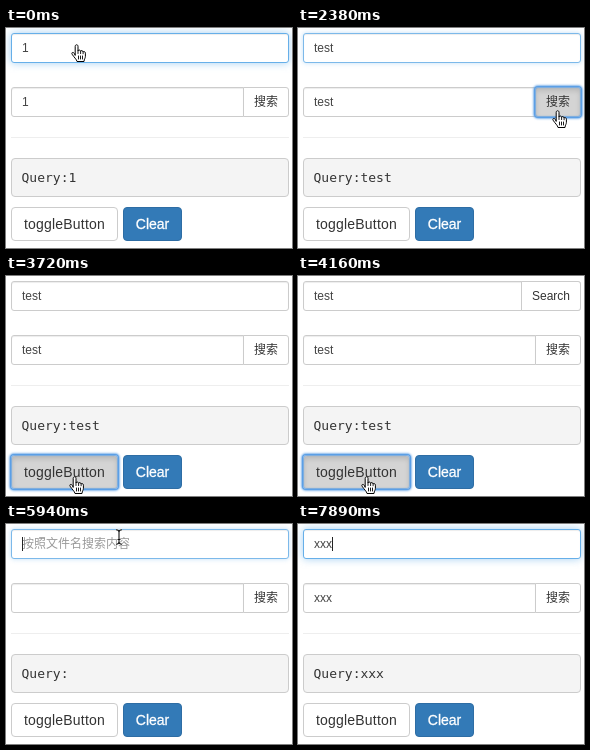
An HTML page that plays this animation: 286 by 220 pixels, repeating every 7.99 s.

```html
<!DOCTYPE html>
<html lang="zh-CN">
<head>
<meta charset="utf-8">
<title>Search box</title>
<style>
  * { box-sizing: border-box; }
  html, body { margin: 0; width: 100%; height: 100%; overflow: hidden; background: #fff; }
  #stage {
    position: relative; width: 286px; height: 220px; overflow: hidden; color: #333;
    font: 12px/18px "Liberation Sans", Arial, "Noto Sans CJK SC", "Noto Sans CJK", sans-serif;
  }
  #stage > * { position: absolute; white-space: pre; }
  .field, .btn { height: 30px; padding: 5px 10px; border: 1px solid #ccc; border-radius: 3px; }
  .field {
    left: 5px; width: 278px; background: #fff; color: #444;
    box-shadow: inset 0 1px 1px rgba(0, 0, 0, .075);
  }
  .field.fading { border-color: #7cb9ea; box-shadow: inset 0 1px 1px rgba(0, 0, 0, .075), 0 0 5px rgba(102, 175, 233, .4); }
  .field.focus { border-color: #66afe9; box-shadow: inset 0 1px 1px rgba(0, 0, 0, .075), 0 0 8px rgba(102, 175, 233, .6); }
  .empty { color: #999; }
  #caret { position: absolute; top: 7px; width: 1px; height: 14px; background: #222; }
  #top { top: 5px; }
  #low { top: 59px; width: 233px; border-radius: 3px 0 0 3px; }
  .btn { background: #fff; text-align: center; }
  .addon { border-radius: 0 3px 3px 0; }
  #go { left: 237px; top: 59px; width: 46px; }
  #extra { left: 223px; top: 5px; width: 60px; }
  .big { top: 179px; height: 34px; padding: 6px 0; border-radius: 4px; font-size: 14px; line-height: 20px; }
  #toggle { left: 5px; width: 107px; letter-spacing: .2px; }
  #clear {
    left: 117px; width: 59px; background: #337ab7; border-color: #2e6da4; color: #fff;
    -webkit-text-stroke: .3px #fff;
  }
  .btn.hover { background: #e6e6e6; border-color: #adadad; }
  .btn.down { background: #d4d4d4; box-shadow: inset 0 3px 5px rgba(0, 0, 0, .125); }
  #clear.hover { background: #286090; border-color: #204d74; }
  #clear.down { background: #245a8a; }
  .btn.ring::after {
    content: ""; position: absolute; inset: -1px; border-radius: 3px;
    box-shadow: 0 0 0 1px #5b9fe6, 0 0 2px 2px rgba(91, 159, 230, .75), inset 0 0 1px 1px rgba(91, 159, 230, .75);
  }
  hr { left: 5px; top: 109px; width: 278px; height: 1px; margin: 0; border: 0; background: #eee; }
  #query {
    left: 5px; top: 130px; width: 278px; height: 39px; margin: 0; padding: 10px 9.5px;
    border: 1px solid #ccc; border-radius: 4px; background: #f4f4f4;
    font: 13px/18px "DejaVu Sans Mono", "Liberation Mono", monospace;
  }
  #pointer { left: 0; top: 0; width: 20px; height: 22px; overflow: visible; }
</style>
</head>
<body>
<div id="stage">
  <div id="top" class="field"><span id="text"></span><i id="caret"></i></div>
  <div id="extra" class="btn addon">Search</div>
  <div id="low" class="field"></div>
  <div id="go" class="btn addon">搜索</div>
  <hr>
  <pre id="query"></pre>
  <div id="toggle" class="btn big">toggleButton</div>
  <div id="clear" class="btn big">Clear</div>
  <svg id="pointer">
    <g id="hand" stroke="#000" stroke-linejoin="round" stroke-linecap="round">
      <path fill="#fff" d="M4.2 11V2.4C4.2 .2 7 .2 7 2.4V7C7.2 5.6 9.5 5.7 9.6 7.3C10 6.1 12 6.4 12.1 8C12.6 7.1 14.4 7.5 14.4 9.2V12.4C14.4 14 13.2 15 13 17.5H6C5.6 15.2 3 13.4 1.1 10.2C.2 8.6 1.9 7.7 3 9Z"/>
      <path fill="none" stroke-width=".9" d="M7 7V9.5M9.6 7.5V9.6M12.1 8.2V9.8M7.5 12V15M9.5 12V15M11.5 12V15"/>
    </g>
    <path id="arrow" fill="#000" stroke="#fff" d="M.6 .8V14.4L3.7 11.5L5.9 16.7L8.2 15.7L6 10.7H10.4Z"/>
    <g id="beam" fill="none">
      <path stroke="#fff" stroke-width="2.6" opacity=".7" d="M1 .8Q4 .8 4 3V13Q4 15.2 1 15.2M7 .8Q4 .8 4 3V13Q4 15.2 7 15.2M2.5 10.5H5.5"/>
      <path stroke="#111" stroke-width="1.1" d="M1 .8Q4 .8 4 3V13Q4 15.2 1 15.2M7 .8Q4 .8 4 3V13Q4 15.2 7 15.2M2.5 10.5H5.5"/>
    </g>
  </svg>
</div>
<script>
const LOOP = 7990;
const HINT = "按照文件名搜索内容";
const $ = id => document.getElementById(id);
const at = (kind, x, y) => ({ kind, x, y });

// Each entry changes only the listed parts of the state.
const steps = [
  [0, { text: "1", caret: false, top: "focus", go: "", toggle: "", clear: "", extra: false, ...at("hand", 65, 16) }],
  [300, { text: "", caret: true }],
  [890, { text: "te" }],
  [1190, { text: "tes" }],
  [1340, { text: "test" }],
  [1640, at("beam", 102, 18)],
  [1790, { caret: false, ...at("arrow", 162, 40) }],
  [1940, at("beam", 212, 62)],
  [2080, { go: "hover", ...at("hand", 246, 76) }],
  [2230, at("hand", 254, 82)],
  [2380, { go: "down ring", top: "fading" }],
  [2530, { go: "hover ring", top: "" }],
  [2830, at("arrow", 244, 92)],
  [2980, at("arrow", 200, 114)],
  [3130, at("beam", 140, 142)],
  [3280, at("arrow", 94, 171)],
  [3420, { toggle: "hover", ...at("hand", 72, 189) }],
  [3570, at("hand", 63, 200)],
  [3720, { go: "", toggle: "down ring" }],
  [3860, { toggle: "hover ring", extra: true }],
  [4160, { toggle: "down ring" }],
  [4310, { toggle: "hover ring", extra: false }],
  [4610, { clear: "hover", ...at("hand", 128, 196) }],
  [4760, at("hand", 154, 194)],
  [5050, { text: "", toggle: "", clear: "hover down ring" }],
  [5500, { clear: "hover ring", ...at("beam", 120, 62) }],
  [5650, at("beam", 109, 5)],
  [5940, { caret: true, top: "fading", clear: "" }],
  [6090, { top: "focus" }],
  [6540, { text: "x" }],
  [6830, { text: "xx" }],
  [6980, { text: "xxx" }],
  [7130, at("beam", 126, 84)],
  [7270, at("beam", 141, 162)],
  [7420, { caret: false, kind: "" }],
  [7890, { caret: true }]
];

function draw(s) {
  $("text").textContent = s.text || HINT;
  $("text").className = s.text ? "" : "empty";
  $("low").textContent = s.text;
  $("query").textContent = "Query:" + s.text;
  $("caret").hidden = !s.caret;
  $("caret").style.display = s.caret ? "block" : "none";
  $("caret").style.left = (s.text ? Math.round(10 + $("text").offsetWidth + .4) : 10) + "px";
  $("top").className = "field " + s.top;
  $("extra").style.display = s.extra ? "block" : "none";
  $("go").className = "btn addon " + s.go;
  $("toggle").className = "btn big " + s.toggle;
  $("clear").className = "btn big " + s.clear;
  for (const kind of ["hand", "arrow", "beam"]) $(kind).style.display = s.kind === kind ? "inline" : "none";
  $("pointer").style.transform = `translate(${s.x}px, ${s.y}px)`;
}

let shown = -1;
const start = performance.now();
function tick() {
  const t = (performance.now() - start) % LOOP;
  const count = steps.filter(([time]) => time <= t).length;
  if (count !== shown) {
    shown = count;
    draw(Object.assign({}, ...steps.slice(0, count).map(([, change]) => change)));
  }
  requestAnimationFrame(tick);
}
tick();
</script>
</body>
</html>
```
